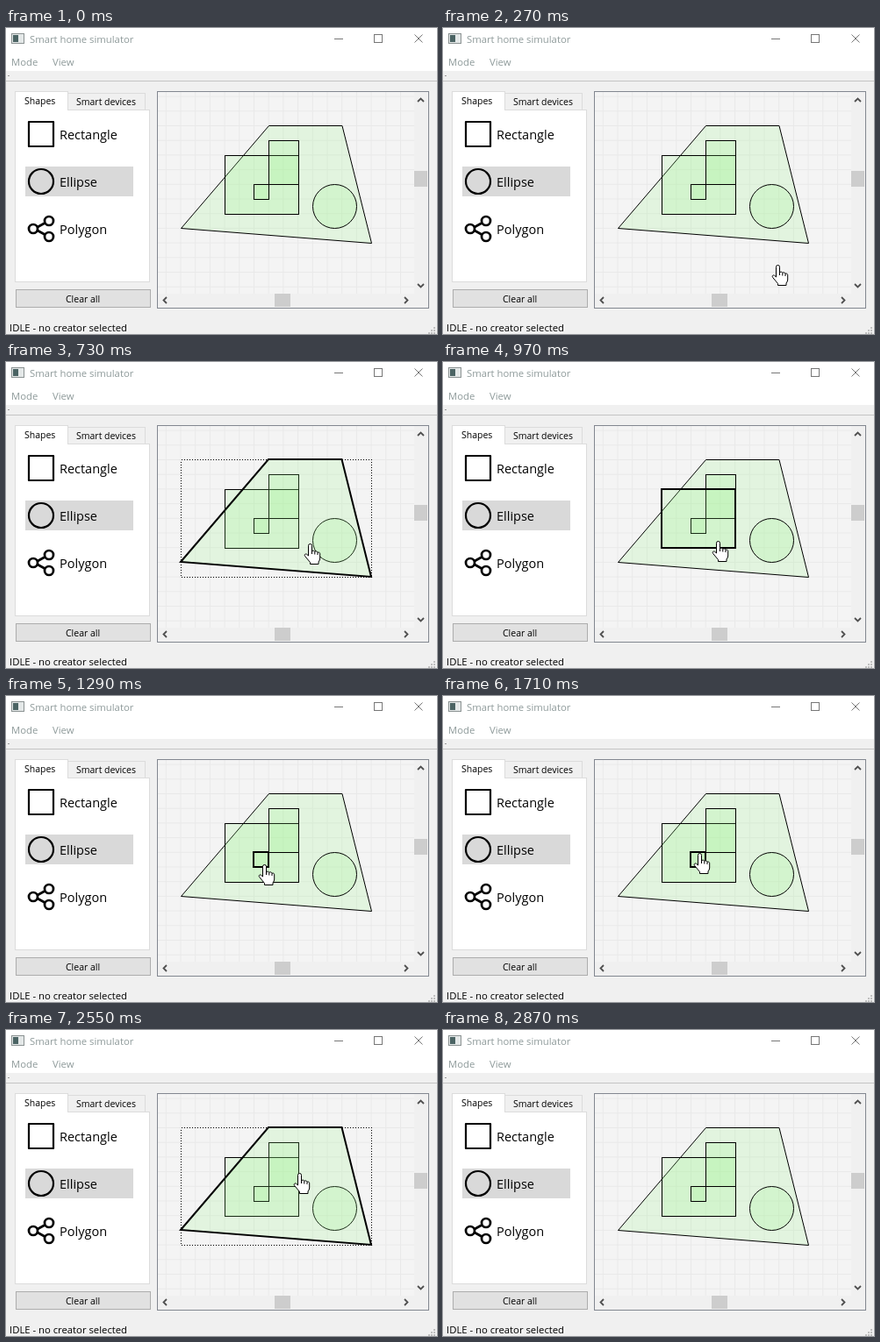
Write an HTML page that moves like this. It is 491 by 349 pixels and loops after 3.2 s.

```html
<!DOCTYPE html>
<html lang="en">
<head>
<meta charset="utf-8">
<title>Smart home simulator</title>
<style>
  html, body { margin: 0; width: 100%; height: 100%; overflow: hidden; background: #f0f0f0; }
  svg { display: block; font: 11.3px "Open Sans", "Noto Sans", sans-serif; }
  .crisp, #shapes rect { shape-rendering: crispEdges; }
  .small { font-size: 10.5px; }
  .tool { font-size: 14.5px; }
  .icon { fill: none; stroke: #000; stroke-width: 2.2; stroke-linejoin: round; }
  .arrow { fill: none; stroke: #505050; stroke-width: 1.8; }
  #shapes > * { fill: rgba(144, 245, 130, .18); stroke: #000; stroke-width: 1; transform: translate(.5px, .5px); }
  #shapes > .hover { stroke-width: 2; transform: none; }
</style>
</head>
<body>
<svg width="491" height="349" viewBox="0 0 491 349">
  <defs>
    <pattern id="grid" x="198.5" y="111" width="16.7" height="16.7" patternUnits="userSpaceOnUse">
      <path d="M.5 0V16.7M0 .5H16.7" stroke="#e9e9e9"/>
    </pattern>
  </defs>

  <!-- Title and menu bars -->
  <rect width="491" height="49" fill="#fff"/>
  <rect y="60" width="491" height="1" fill="#c4c4c4"/>
  <rect x="2" y="54" width="2" height="1" fill="#999"/>
  <g class="crisp">
    <rect x="6.5" y="6.5" width="14" height="11" fill="#e4e8e8" stroke="#8b9292"/>
    <rect x="8" y="8" width="6" height="8" fill="#4b6464"/>
    <path d="M374 12.5h10M419.5 7.5h9v9h-9z" fill="none" stroke="#777"/>
  </g>
  <path d="M465.5 7.5l9 9m0-9l-9 9" stroke="#777"/>
  <g fill="#8e9a9a">
    <text x="27" y="17">Smart home simulator</text>
    <text x="6" y="43">Mode</text>
    <text x="53" y="43">View</text>
  </g>

  <!-- Tool panel -->
  <g class="crisp" stroke="#dcdcdc">
    <rect x="10.5" y="93.5" width="153" height="196" fill="#fff"/>
    <rect x="70.5" y="74.5" width="88" height="19" fill="#f0f0f0"/>
    <path d="M10.5 94V72.5h60V94" fill="#fff"/>
    <rect x="11.5" y="298.5" width="153" height="20" fill="#e1e1e1" stroke="#adadad"/>
  </g>
  <rect x="22" y="158" width="123" height="34" fill="#d9d9d9"/>
  <g class="icon">
    <rect x="26" y="107" width="28" height="28"/>
    <circle cx="40" cy="175" r="14"/>
    <g stroke-width="2.7">
      <path d="M36 227l9-5M36 231l9 5"/>
      <circle cx="31" cy="229" r="5"/>
      <circle cx="49" cy="220" r="5"/>
      <circle cx="49" cy="238" r="5"/>
    </g>
  </g>
  <g class="small">
    <text x="21" y="87">Shapes</text>
    <text x="80" y="88">Smart devices</text>
    <text x="68" y="313">Clear all</text>
  </g>
  <g class="tool">
    <text x="61" y="127">Rectangle</text>
    <text x="61" y="181">Ellipse</text>
    <text x="61" y="235">Polygon</text>
  </g>
  <text x="4" y="346">IDLE - no creator selected</text>
  <path d="M488 341v8M485 344v5M482 347v2" stroke="#bfbfbf" stroke-width="2" stroke-dasharray="2 1"/>

  <!-- Scene view -->
  <rect class="crisp" x="172.5" y="72.5" width="309" height="247" fill="#f0f0f0" stroke="#828790"/>
  <rect x="173" y="73" width="292" height="230" fill="#f4f4f4"/>
  <rect x="173" y="73" width="292" height="230" fill="url(#grid)"/>
  <path d="M465 163h15v18h-15zM306 303h18v15h-18z" fill="#cdcdcd"/>
  <path class="arrow" d="M469 84l3.5-3.5 3.5 3.5M469 292l3.5 3.5 3.5-3.5M183 307l-3.5 3.5 3.5 3.5M454 307l3.5 3.5-3.5 3.5"/>

  <g id="shapes">
    <path d="M199 228L299 111H382.5L416 245Z"/>
    <circle cx="374" cy="203" r="25"/>
    <rect x="249" y="145" width="84" height="67"/>
    <rect x="299" y="128" width="34" height="50"/>
    <rect x="282" y="178" width="17" height="17"/>
  </g>
  <rect id="frame" class="crisp" transform="translate(.5 .5)" fill="none" stroke="#000" stroke-dasharray="1 2"/>
  <g id="hand" stroke="#000" stroke-linejoin="round">
    <path fill="#fff" d="M-2.5 14V2.5a2 2 0 0 1 4 0V9a1.8 1.8 0 0 1 3.3 .5a1.8 1.8 0 0 1 3.2 1a1.6 1.6 0 0 1 2.7 1.2V17q0 2-1.7 4v2.5H-.5v-2L-6.3 14.5c-1.5-2 .7-3.3 2.2-2Z"/>
    <path fill="none" d="M1.5 9v3M4.8 9.5v3M8 10.5v2.5"/>
  </g>
</svg>
<script>
const LOOP = 3200, STEP = 47;
const svg = document.querySelector('svg');
const $ = id => document.getElementById(id);
const group = $('shapes'), hand = $('hand'), frame = $('frame');
const shapes = [...group.children];

// Each move bends by way of a point and begins where the last one ended
const moves = [
  { start: 120, end: 450, via: [384, 265], to: [374, 210] },   // circle
  { start: 590, end: 780, via: [352, 208], to: [329, 205] },   // large rectangle
  { start: 920, end: 1100, via: [307, 205], to: [302, 200] },
  { start: 1240, end: 1380, via: [295, 193], to: [288, 183] }, // small square
  { start: 1610, end: 1800, via: [286, 170], to: [305, 189] },
  { start: 1940, end: 2130, via: [306, 178], to: [307, 167] }, // tall rectangle
  { start: 2410, end: 2870, via: [317, 100], to: [485, 372] }, // out past the corner
];
let from = [384, 341];
for (const m of moves) {
  m.from = from;
  from = m.to;
}
const enter = moves[0].start, leave = moves.at(-1).end;

// The pointer is sampled in even steps, the first one at the start time
function pointer(t) {
  const { start, end, from, via, to } = moves.findLast(m => t >= m.start);
  const gaps = Math.round((end - start) / STEP);
  const done = Math.min(1, (t - start) / (end - start));
  const s = (1 + Math.floor(done * gaps + .001)) / (gaps + 1), r = 1 - s;
  return from.map((v, i) => Math.round(r * r * v + 2 * r * s * via[i] + s * s * to[i]));
}

function shapeAt(x, y) {
  const p = svg.createSVGPoint();
  p.x = x;
  p.y = y;
  return shapes.findLast(s => s.isPointInFill(p));
}

// The hovered shape is outlined, framed and raised above the others
let hovered;
function hover(shape) {
  if (shape === hovered) return;
  hovered = shape;
  group.append(...shapes);
  for (const s of shapes) s.classList.toggle('hover', s === shape);
  if (!shape) return;
  group.append(shape);
  const box = shape.getBBox();
  for (const k of ['x', 'y', 'width', 'height']) frame.setAttribute(k, box[k]);
}

function draw(t) {
  const visible = t >= enter && t < leave;
  const [x, y] = visible ? pointer(t) : [-99, -99];
  hand.setAttribute('transform', `translate(${x} ${y})`);
  hover(shapeAt(x, y));
  frame.style.display = hovered ? '' : 'none';
}

function tick() {
  draw(performance.now() % LOOP);
  requestAnimationFrame(tick);
}
tick();
</script>
</body>
</html>
```
